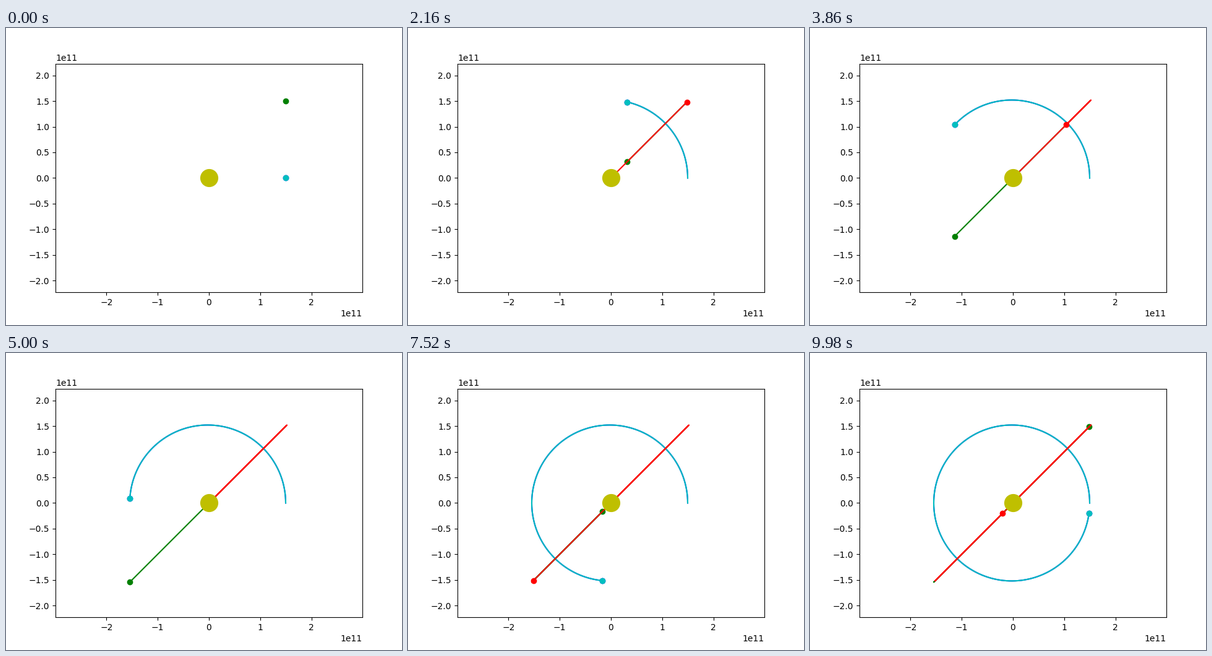
A matplotlib script that plays this animation: 640x480 px, repeating every 10 s.

```python
import numpy as np
import matplotlib.pyplot as plt
from matplotlib.animation import FuncAnimation

FRAMES = 500
PERIOD = 509.5        # frames per full orbit
AU = 1.496e11
ECC = 0.0159


def orbit(n):
    """Kepler orbit starting at perihelion, sampled once per frame."""
    mean = 2 * np.pi * np.arange(n) / PERIOD
    ecc_anom = mean.copy()
    for _ in range(8):
        ecc_anom = mean + ECC * np.sin(ecc_anom)
    a = AU / (1 - ECC)
    x = a * (np.cos(ecc_anom) - ECC)
    y = a * np.sqrt(1 - ECC**2) * np.sin(ecc_anom)
    return x, y


x, y = orbit(FRAMES)

fig, ax = plt.subplots(figsize=(6.4, 4.8), dpi=100)
half = 2 * AU
ax.set_xlim(-half, half)
ax.set_ylim(-half * 369.6 / 496, half * 369.6 / 496)

# Each body: colour and its path; later ones are drawn on top.
bodies = [("b", x, y), ("c", x, y), ("g", x, x), ("r", y, y)]
trails, dots = [], []
for color, px, py in bodies:
    trails.append(ax.plot([], [], color=color, lw=1.5)[0])
    dots.append(ax.plot([], [], "o", color=color, ms=6)[0])
ax.plot([0], [0], "o", color="y", ms=20)


def update(i):
    for (_, px, py), trail, dot in zip(bodies, trails, dots):
        trail.set_data(px[:i + 1], py[:i + 1])
        dot.set_data(px[i:i + 1], py[i:i + 1])
    return trails + dots


anim = FuncAnimation(fig, update, frames=FRAMES, interval=20,
                     repeat=True, repeat_delay=0)
plt.show()
```
